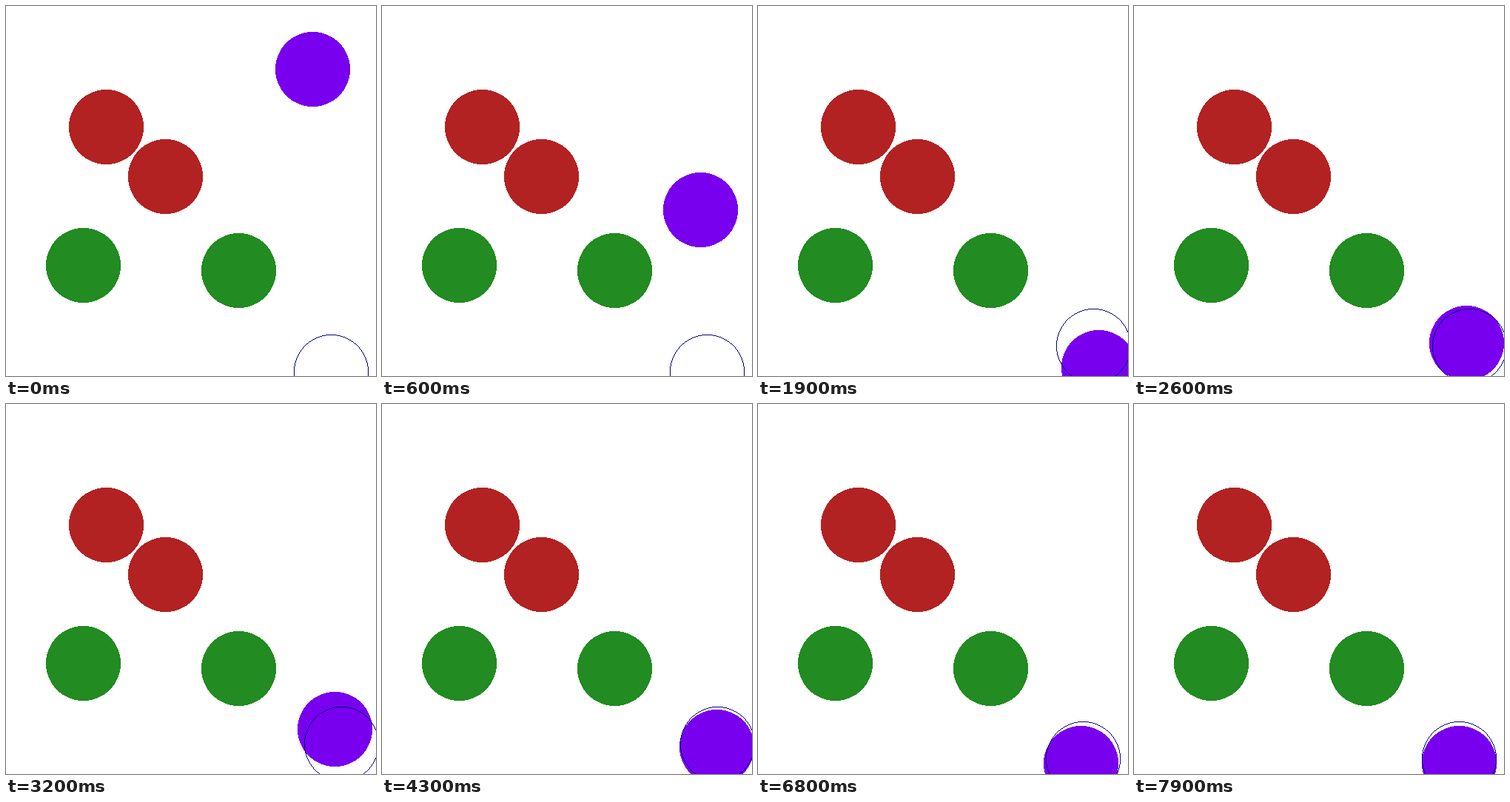
Recreate the animation shown at these times as an HTML page with a canvas. Size 500 px wide and 500 px high, loop 8 s.

```html
<!DOCTYPE html>
<html lang="en">
<head>
<meta charset="utf-8">
<title>Bouncing ball</title>
<style>
  html, body { margin: 0; width: 100%; height: 100%; overflow: hidden; background: #fff; }
  canvas { display: block; }
</style>
</head>
<body>
<canvas id="stage" width="500" height="500"></canvas>
<script>
const STEP = 100, STEPS = 80, R = 50, FLOOR = 500;
const ctx = document.getElementById('stage').getContext('2d');

// Turning points of the swing after the fall: step, x, y
const turns = [[13.4, 464, 500], [32.7, 444, 439], [53, 459, 485], [73.4, 432, 485], [93, 469, 485]];

// Hard-edged disc, filled row by row
function disc(x, y, color) {
  ctx.fillStyle = color;
  for (let dy = -R; dy <= R; dy++) {
    const half = Math.floor(Math.sqrt((R + 0.5) ** 2 - dy * dy));
    ctx.fillRect(x - half, y + dy, 2 * half + 1, 1);
  }
}

// Hard-edged circle one pixel wide, drawn in eight mirrored arcs
function ring(x, y, color) {
  ctx.fillStyle = color;
  for (let a = 0; a <= R * Math.SQRT1_2; a++) {
    const b = Math.round(Math.sqrt(R * R - a * a));
    for (const [dx, dy] of [[a, b], [b, a]]) {
      for (const sx of [-1, 1]) {
        for (const sy of [-1, 1]) ctx.fillRect(x + sx * dx, y + sy * dy, 1, 1);
      }
    }
  }
}

// Accelerating fall down to the floor
const fall = s => [
  414 + 1.556 * s + 0.185 * s * s,
  Math.min(FLOOR, 85 + 15.67 * s + 2.667 * s * s)
];

// Harmonic swing from one turning point to the next
function swing(s) {
  const i = turns.findLastIndex(t => s >= t[0]);
  const [t0, x0, y0] = turns[i], [t1, x1, y1] = turns[i + 1];
  const k = (1 - Math.cos(Math.PI * (s - t0) / (t1 - t0))) / 2;
  return [x0 + (x1 - x0) * k, y0 + (y1 - y0) * k];
}

function draw(time) {
  const s = Math.floor(time / STEP) % STEPS;
  const [x, y] = (s < turns[0][0] ? fall(s) : swing(s)).map(Math.round);
  const goal = s < 14 ? [439, 494] : s < 56 ? [453, 459] : [439, 479];

  ctx.clearRect(0, 0, 500, 500);
  disc(135, 163, '#b22222');
  disc(215, 230, '#b22222');
  disc(104, 350, '#228b22');
  disc(314, 357, '#228b22');
  disc(x, y, '#7800ee');
  ring(...goal, '#000080');
}

const start = performance.now();
function tick() {
  draw(performance.now() - start);
  requestAnimationFrame(tick);
}
tick();
</script>
</body>
</html>
```
